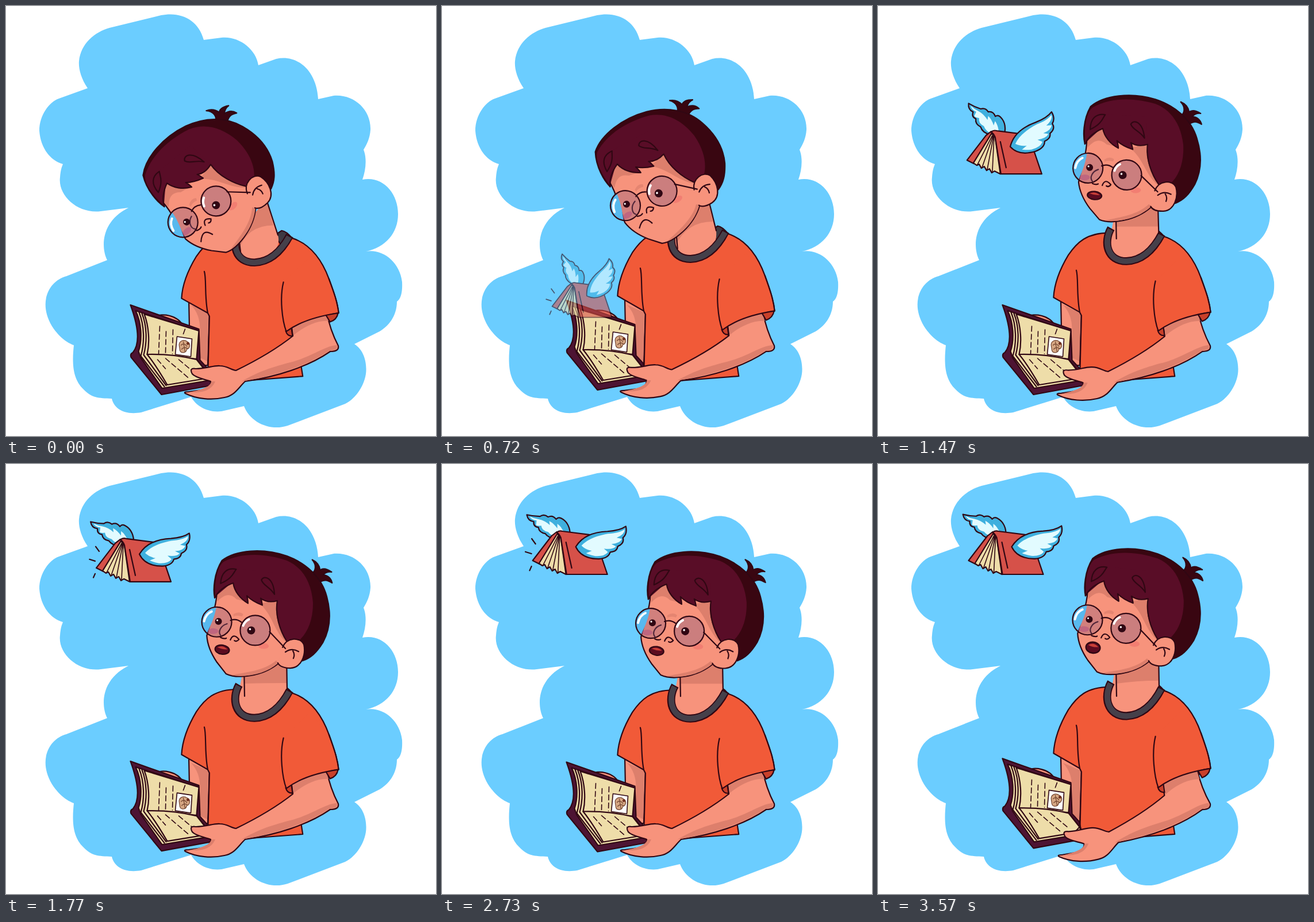
Recreate the animation shown at these times as an HTML page. Size 748 by 748 pixels, loop 3600 ms.

```html
<!DOCTYPE html>
<html lang="en">
<head>
<meta charset="utf-8">
<title>Boy and the flying book</title>
<style>
  html, body { margin: 0; width: 100%; height: 100%; overflow: hidden; background: #fff; }
  svg { display: block; width: 100vw; height: 100vh; }
  path, circle, ellipse, line { stroke-linecap: round; stroke-linejoin: round; }
  .o { stroke: #300713; stroke-width: 2.2; }
  .l { fill: none; stroke: #300713; stroke-width: 2.2; }
  .thin { stroke-width: 1.6; }
  .flat { stroke-linecap: butt; }
  .skin { fill: #f7937c; }
  .shade { fill: #dd7f6c; }
  .shirt { fill: #f15a38; }
  .hair { fill: #590d27; }
  .dark { fill: #390611; }
  .page { fill: #eedda9; }
  .red { fill: #d65149; }
</style>
</head>
<body>
<svg viewBox="0 0 748 748" xmlns="http://www.w3.org/2000/svg">
  <path fill="#6bcdff" d="M142 143C130 125 126 108 127 96C130 65 155 45 180 38L270 16C305 9 335 25 344 59L375 55C405 52 435 75 439 103L470 92C505 84 540 110 543 162L570 156C605 153 635 180 634 215C633 230 628 240 622 250C628 265 626 285 620 302C655 295 682 325 682 362C682 395 660 420 626 427C655 422 685 445 689 480C690 500 686 510 680 514C680 540 665 557 650 566L606 588C625 600 628 625 626 640C622 665 605 685 590 692L490 730C460 740 425 725 414 696L375 705C350 708 330 695 322 680L235 707C205 712 188 700 184 683C160 682 150 682 135 667C115 648 115 620 118 590C110 587 95 580 80 557C55 515 75 478 105 470L176 442C165 420 165 375 213 351L165 357C125 362 90 330 94 298C95 285 97 280 99 275C75 268 60 245 58 217C58 190 75 167 92 161Z"/>

  <path class="skin o" d="M318 510L319 560L325 625H351L354 530Z"/>
  <path class="shade" d="M322 520L352 533L350 618L338 612C335 570 345 545 322 520Z"/>

  <g id="torso">
    <path class="shirt o" d="M402 391C362 391 345 408 330 430C312 460 305 485 304 505L350 531L353 537L350 652L412 652L517 644L512 612L498 572L580 531C578 512 572 495 563 470C552 440 532 408 497 397Z"/>
    <path class="l" d="M344 457C348 470 344 500 350 531"/>
    <path fill="#3e3942" class="o" d="M468 392L480 384Q488 385 498 397L480 412Z"/>
  </g>

  <path id="neck" class="skin"/>
  <path id="neckShade" class="shade"/>
  <path id="neckLine" class="l"/>

  <g id="collar" fill="none">
    <path class="flat" stroke="#300713" stroke-width="14" d="M405 383C391 408 398 441 432 441C460 440 480 420 494 393"/>
    <path class="flat" stroke="#45404a" stroke-width="10" d="M404 385C392 408 399 441 432 441C460 440 479 420 493 395"/>
  </g>

  <g id="head">
    <path class="dark o" d="M529 191C538 186 539 175 531 166C540 170 544 177 545 184C550 180 556 181 565 187C558 186 553 189 550 192C558 193 564 198 566 206C556 200 552 201 546 204Z"/>
    <path class="dark o" d="M362 234C359 220 360 192 374 169C398 150 445 146 487 160C520 172 548 196 557 230C564 255 566 282 551 310C540 328 530 337 516 342L480 320L400 190Z"/>
    <path class="skin o" d="M366 220C366 250 352 285 349 300C350 315 356 330 367 346L383 366C402 375 445 371 474 347L496 325L490 240L400 190Z"/>
    <path class="shade" d="M392 368C420 372 452 366 474 346L470 342C450 360 420 363 392 368ZM440 243L470 238C467 262 478 290 487 310C465 290 463 262 440 243Z"/>
    <path class="shade" d="M367 222L394 209L402 226L420 241L400 236C390 226 380 226 367 240Z"/>
    <path class="shade" opacity=".7" d="M395 262Q405 256 412 262L410 266Q402 263 395 266Z"/>
    <path class="hair" d="M363 232C361 205 366 180 377 171C410 154 450 156 487 168C515 180 530 206 533 240C534 270 524 295 508 308L488 308C474 285 466 265 471 238L400 200Z"/>
    <path class="hair" d="M362 234C368 222 378 214 394 208C396 222 406 235 420 243C420 238 419 234 418 230C426 238 434 242 445 246C444 241 444 238 442 234C450 240 460 241 471 238L470 190L370 180Z"/>
    <path class="l" d="M362 234C368 222 378 214 394 208C396 222 406 235 420 243C420 238 419 234 418 230C426 238 434 242 445 246C444 241 444 238 442 234C450 240 460 241 471 238C467 262 476 290 488 308"/>
    <path class="l" d="M372 209C373 190 383 181 399 184C394 190 393 200 372 209ZM443 202C448 193 464 198 466 227C458 214 446 212 443 202Z"/>
    <path class="skin o" d="M481 319C488 301 512 300 518 314C522 332 514 354 495 355C484 355 476 352 473 346"/>
    <path class="l" d="M486 327Q497 319 509 326M499 325Q503 331 500 338"/>
    <ellipse cx="448" cy="317" rx="9" ry="5" fill="#ee6f6c" opacity=".6"/>
    <path class="l" d="M384 279C373 282 368 293 373 299M373 303Q379 306 383 304M390 307Q395 294 405 306Q401 311 397 308"/>
    <circle cx="366" cy="276" r="26" fill="#8e6080" opacity=".36"/>
    <path fill="#58b9ee" d="M365 250C362 270 353 287 349 296A26 26 0 0 1 365 250Z"/>
    <circle cx="433" cy="290" r="26" fill="#8e6080" opacity=".42"/>
    <ellipse cx="360" cy="292" rx="9" ry="5" fill="#b45580" opacity=".6"/>
    <g id="eyes">
      <circle cx="369" cy="275" r="6" fill="#300713"/><circle cx="367" cy="273" r="1.6" fill="#fff"/>
      <circle cx="426" cy="290" r="7" fill="#300713"/><circle cx="424" cy="288" r="1.8" fill="#fff"/>
    </g>
    <path fill="none" stroke="#fff" stroke-width="4" d="M344 275Q347 262 357 258M412 282Q415 274 422 271"/>
    <g class="l">
      <circle cx="366" cy="276" r="26"/><circle cx="433" cy="290" r="26"/>
      <path d="M390 273Q400 269 409 276M458 292L486 321"/>
    </g>
    <path id="frown" class="l" d="M365 322Q383 306 388 327"/>
    <g id="mouth">
      <ellipse class="o" rx="12.5" ry="8.4" fill="#5c0b20"/>
      <path fill="#c93f38" d="M-9-3Q0-9 9-2Q0 0-9-3Z"/>
    </g>
  </g>

  <g id="book">
    <path class="skin o" d="M259 536C268 528 298 533 306 551L290 552Z"/>
    <path class="o" fill="#4d1433" d="M215 515L334 557L336 611L348 624L356 655L269 671L216 606Q214 600 219 598C234 580 226 545 215 515Z"/>
    <path class="page o" d="M224 525C234 545 236 575 229 596L233 607L270 660L354 646L348 632L330 609L333 560Z"/>
    <path class="page o" d="M239 531L334 560L330 609Q285 604 244 601C249 580 247 552 239 531Z"/>
    <path class="page o" d="M244 601Q290 600 330 610L349 634L340 644L279 654C268 635 258 618 244 601Z"/>
    <path class="l" d="M230 528C239 550 240 580 233 604M235 530C244 552 244 580 238 602M233 604L274 657M238 602L277 655"/>
    <path class="l thin" stroke-dasharray="9 5" d="M266 552L264 600M277 561L276 598M289 558L288 600M310 557L306 568M262 610L276 626M276 608L316 642M299 610L330 636"/>
    <path fill="#fff" class="o thin" d="M296 570L322 574L320 605L293 601Z"/>
    <path fill="#d6a783" stroke="#70432f" stroke-width="1.2" d="M300 587C298 578 307 574 314 579C321 583 318 591 313 592C312 599 303 600 301 594ZM303 585Q309 580 313 587M304 592Q309 587 314 591M307 579L310 597"/>
    <circle cx="315" cy="582" r="2.5" fill="#70301f"/>
  </g>

  <g id="arm">
    <path class="skin o" d="M496 550L557 530C562 555 569 574 578 591Q580 601 564 601C525 628 470 645 416 653C405 663 398 678 380 681C358 686 332 684 312 674Q308 671 318 671L340 668C350 666 358 660 356 653C345 649 330 647 324 640Q318 629 330 631C350 631 360 625 372 626C385 626 391 633 400 634C435 617 470 597 499 574Z"/>
    <path class="shade" d="M499 552L557 533L561 548C540 546 515 560 500 573ZM576 590C556 590 530 612 490 621C465 628 440 635 410 653C470 643 525 625 562 600Q578 599 576 590Z"/>
    <path class="shade" d="M318 672C345 674 358 667 364 653L357 653C356 662 342 667 318 672Z"/>
  </g>

  <g id="sleeve">
    <path fill="#c9402a" class="o" d="M487 563Q490 573 499 572L497 558ZM556 532L565 547Q577 543 579 531Z"/>
    <path class="shirt" d="M483 476C476 505 481 545 488 564Q520 540 579 530C575 505 570 490 562 472L530 430Z"/>
    <path class="l" d="M483 476C476 505 481 545 488 564Q520 540 580 531C578 512 572 495 563 470"/>
  </g>

  <g id="fly">
    <g id="wingL">
      <path class="o" fill="#3fb0de" d="M222 138C223 124 217 113 208 108Q202 104 198 109Q192 101 184 105Q177 99 170 104Q159 104 147 101Q149 112 159 113Q158 122 167 123Q168 132 179 134Q185 143 200 142Z"/>
      <path fill="#e2fbff" d="M215 140C210 128 206 121 200 117L200 125Q194 116 186 112L187 119Q178 111 168 109Q160 108 152 104Q155 110 164 111L163 119Q165 121 172 120Q173 129 184 131Q190 139 202 140Z"/>
    </g>
    <path class="red o" d="M199 131L190 138L157 181L169 187L202 140Z"/>
    <path class="page o" d="M200 134L168 186L174 190L178 188L182 195L187 192L191 199L196 196L200 203L205 200L215 205L206 142Z"/>
    <path class="l thin" d="M201 138L175 189M202 139L183 194M203 140L192 198M204 140L201 202"/>
    <path class="red o" d="M199 132Q203 128 209 130L264 137L287 205L216 205L206 141Q203 134 199 132Z"/>
    <path class="l" d="M215 149L225 194"/>
    <g id="wingR">
      <path class="o" fill="#3fb0de" d="M232 157C243 139 262 131 287 130C302 129 312 126 319 121Q322 134 314 141Q317 151 305 156Q304 165 292 166Q289 177 272 178C254 178 239 172 232 157Z"/>
      <path fill="#e2fbff" d="M242 155C252 144 267 138 288 134C301 133 310 131 317 126Q317 135 303 141L312 143Q309 151 294 152L302 156Q297 162 281 160L288 166Q282 174 266 173Q256 171 250 168L260 164Q249 162 242 155Z"/>
    </g>
    <g id="rays" class="l">
      <path pathLength="1" d="M162 152L154 141"/><path pathLength="1" d="M155 169L142 165"/><path pathLength="1" d="M155 191L151 200"/>
    </g>
  </g>
</svg>
<script>
const LOOP = 3600, BREATH = 1470, FLAP = 600, RAYS = 1000;
const el = {};
document.querySelectorAll('[id]').forEach(e => el[e.id] = e);

// rows of [time, value]
const tilt = [[0, -44.5], [300, -43], [720, -33.5], [1170, -8.5], [1600, -.5], [2220, 1], [2730, -.3], [3570, .5]];
const headX = [[0, 439], [300, 441], [720, 458], [1170, 493], [1770, 497], [2220, 494], [3570, 495]];
const headY = [[0, 319], [720, 324], [1170, 326], [1770, 329], [2220, 326], [2730, 328], [3570, 330]];
const armTurn = [[0, 0], [720, .5], [1170, -1], [1770, 0], [2220, .5], [2730, 0], [3570, -2]];
const flyX = [[560, 252], [720, 246], [1170, 221], [1770, 225], [3600, 225.5]];
const flyY = [[560, 535], [720, 514], [1170, 346], [1620, 215], [1770, 170], [1950, 157], [3600, 157]];
const flySize = [[560, .7], [720, .8], [1000, 1]];

const clamp = v => Math.min(1, Math.max(0, v));
const wave = (t, period) => Math.cos(2 * Math.PI * t / period);

// Smooth curve through the rows, flat at the ends and at turning points
function at(rows, t) {
  const n = rows.length - 1;
  if (t <= rows[0][0]) return rows[0][1];
  if (t >= rows[n][0]) return rows[n][1];
  const i = rows.findIndex(r => r[0] > t) - 1;
  const slope = j => {
    if (j === 0 || j === n) return 0;
    const [a, b, c] = rows.slice(j - 1, j + 2);
    return (b[1] - a[1]) * (c[1] - b[1]) <= 0 ? 0 : (c[1] - a[1]) / (c[0] - a[0]);
  };
  const [t0, p] = rows[i], [t1, q] = rows[i + 1], d = t1 - t0, u = (t - t0) / d;
  const h = u * u * (3 - 2 * u);
  return p + (q - p) * h + d * (slope(i) * u * (1 - u) ** 2 - slope(i + 1) * u * u * (1 - u));
}

const move = (e, ...parts) => e.setAttribute('transform', parts.join(' '));

// k: 0 with the head bowed, 1 upright; the top of the neck hides behind the head
function drawNeck(k, drop) {
  const rx = 453 + 35 * k, ry = 330 + drop;
  const bx = 473 + 16 * k, by = 392 + drop;
  const lx = 404 + 10 * k, ly = 395 - 45 * k, ex = 408 + 7 * k, ey = 428 - 24 * k;
  const jaw = 375 + 5 * k + drop;
  el.neck.setAttribute('d', `M${lx} ${ly}L${rx} ${ry}L${bx} ${by}C480 425 455 440 432 440C405 438 399 420 404 402Z`);
  el.neckShade.setAttribute('d', `M${lx} ${ly}L${rx} ${ry}L${rx + (bx - rx) * .6} ${jaw}Q${rx - 35} ${jaw} ${lx} ${ly + 32}Z`);
  el.neckLine.setAttribute('d', `M${lx} ${ly}L${ex} ${ey}M${rx} ${ry}L${bx} ${by}`);
}

function drawBoy(t) {
  const bob = wave(t, BREATH), turn = at(tilt, t), k = clamp((turn + 44.5) / 44.5);
  const drop = 3.5 * bob + 3 * (1 - k);
  const breathe = `translate(442 650) scale(.99 ${1 - drop / 258}) translate(-442 -650)`;
  [el.torso, el.collar, el.sleeve].forEach(e => move(e, breathe));
  drawNeck(k, drop);
  move(el.head, `translate(${at(headX, t)} ${at(headY, t) + 4 * bob})`, `rotate(${turn})`, 'translate(-497 -330)');
  const down = 1 - clamp(4 * k);
  move(el.eyes, `translate(${2 * down} ${5 * down})`);
  const talking = t >= 900;
  el.frown.style.display = talking ? 'none' : '';
  el.mouth.style.display = talking ? '' : 'none';
  move(el.mouth, 'translate(376 324) rotate(8)', `scale(1 ${1 - .15 * bob})`);
  move(el.book, `translate(1.5 ${1 + 4 * bob})`);
  move(el.arm, `rotate(${at(armTurn, t)} 570 595)`);
}

function drawFly(t) {
  el.fly.setAttribute('opacity', clamp((t - 590) / 220));
  move(el.fly, `translate(${at(flyX, t)} ${at(flyY, t)})`, `scale(${at(flySize, t)})`, 'translate(-225 -170)');
  const lift = wave(t - 150, FLAP) + .31;
  move(el.wingR, `rotate(${-29 * lift} 234 157)`);
  move(el.wingL, `rotate(${28 * lift} 216 134)`);
  const p = (t - 590 + RAYS) % RAYS, len = p < 100 ? p / 100 : 1.05 - p / 610;
  el.rays.style.display = p < 610 ? '' : 'none';
  el.rays.setAttribute('stroke-dasharray', `${Math.max(.05, len)} 2`);
}

function frame(now) {
  const t = now % LOOP;
  drawBoy(t);
  drawFly(t);
  requestAnimationFrame(frame);
}
frame(0);
</script>
</body>
</html>
```
